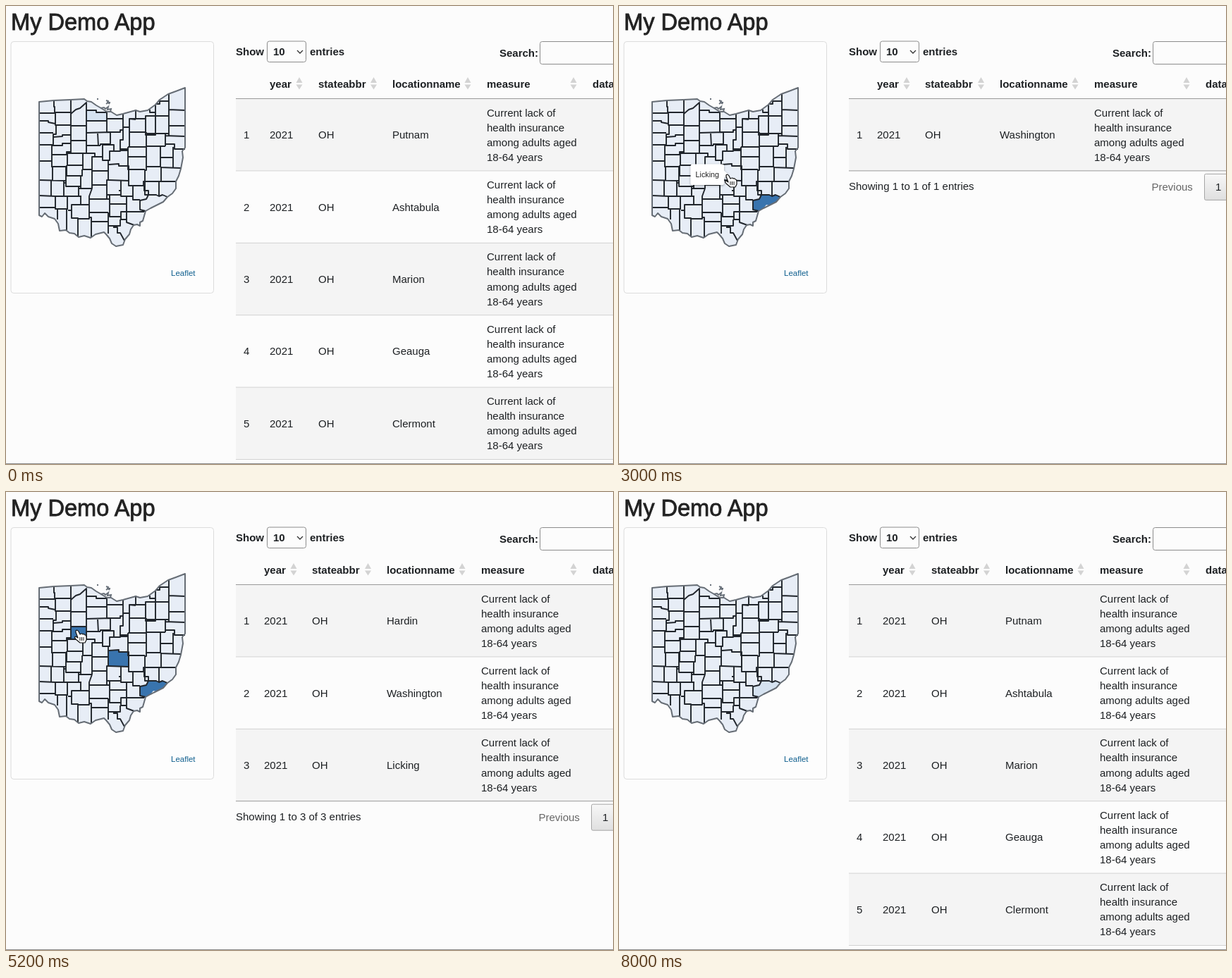
Recreate the animation shown at these times as an HTML page. Size 861 by 650 pixels, loop 8.2 s.

```html
<!DOCTYPE html>
<html lang="en">
<head>
<meta charset="utf-8">
<title>My Demo App</title>
<style>
html, body { margin: 0; width: 100%; height: 100%; overflow: hidden; background: #fcfcfc; }
svg { display: block; }
text { font: 15px "Liberation Sans", Arial, sans-serif; fill: #1d2023; }
.b { font-weight: bold; }
.title { font-size: 32.6px; fill: #222; stroke: #222; stroke-width: .8px; }
.link { font-size: 11.5px; fill: #11608f; }
.muted { fill: #666; }
.box { fill: #fcfcfc; stroke: #8c8c8c; }
.borders path { fill: none; stroke: #20252b; stroke-width: 1.9; stroke-linejoin: round; }
#tip text { font-size: 10.75px; fill: #222; }
#tip rect, #tip path { fill: #fff; }
</style>
</head>
<body>
<svg width="861" height="650" viewBox="0 0 861 650">
  <defs>
    <linearGradient id="btn" x2="0" y2="1"><stop stop-color="#f7f7f7"/><stop offset="1" stop-color="#dfdfdf"/></linearGradient>
    <filter id="shade" x="-20%" y="-30%" width="140%" height="180%"><feDropShadow dx="0" dy="1" stdDeviation="1.5" flood-opacity=".4"/></filter>
  </defs>
  <rect width="861" height="650" fill="#fcfcfc"/>
  <text class="title" x="7" y="34">My Demo App</text>
  <rect x="7" y="50.5" width="287.5" height="357" rx="4" fill="#fdfdfd" stroke="#dcdcdc"/>

  <path id="land" fill="#e7edf6" d="M47 136L68 134L92 133L111 132L115 135L121 136L128 141L135 145L143 150L149 150L157 155L166 153L184 148L190 150L201 148L212 140L218 133L230 125L241 121L254 116V201L250 206L251 215L248 231L245 241L241 249L241 259L236 266L229 271L223 278L213 283L205 287L198 291L196 298L194 305L190 307V312L186 310L181 311L177 317L175 324L169 331L166 339L156 341L150 337L147 330L142 324L139 321L127 324L120 329L111 326L103 328L97 323L90 322L85 318L76 319L74 309L69 302L60 299L55 294L51 299L47 297Z"/>
  <g id="fills">
    <path data-name="Sandusky" d="M114 148H128V151H143V163H114Z"/>
    <path data-name="Hardin" d="M92 191H114V209H92Z"/>
    <path data-name="Licking" d="M146 225L160 224V227H174V248L146 247Z"/>
    <path data-name="Washington" d="M190 276L199 274L202 268H213L217 270L222 268L229 271L223 278L213 283L209 282L205 287L198 291L190 289Z"/>
  </g>
  <g class="borders">
    <path d="M68 134V143H69V151M47 152H70V151H92M92 133V208M92 153L99 147L105 145L114 137V210M47 163H60V165L70 167M70 151V169H92M47 180H67M71 168V182H67V198M92 170H114M67 186L80 185V183H92M47 197H67M92 191H114M65 198H80V195H92M65 198V229M65 211H86V207H92M87 209H114"/>
    <path d="M114 148H128V151H143M143 149V179M114 163H143M114 180L148 179M130 180L131 199M114 198H134M143 160H166M143 179H162V176H166M148 179V197M134 198V196H148M166 153V190H162V204M184 147V160H175V200M166 172H175M175 179H199M175 160L184 161"/>
    <path d="M184 160H198V156H231M204 147V151H212V156M212 156V140M212 139H218V135H231M231 125V184M231 147L254 148M231 170H254M198 156V183H212V156M200 181H231M226 184L254 185M226 181V199M199 179V228M173 200H199M199 199H226M226 196H239V203H254M219 199V228M219 215H237V200M237 215V230M219 229L248 230M173 200V205H163M173 205V214H199M173 214V232H197M199 228H220"/>
    <path d="M114 209H126V214H137M137 197V219H147V206H153V197H137M147 206H162V203H173M126 214H122V259M145 219V248M122 234H146M109 209V232H122M87 207V226H110M86 226V241H108V232M65 228H86M47 220H65M66 228V247M47 247L85 248M85 228V256H106M106 240V258M122 259H103M122 254H143M146 247H143V274M146 225L160 224V227H174V248L146 247"/>
    <path d="M64 247V270M47 269L70 270H103M82 247V269M82 251H85M103 256V270H107M70 269V287M47 286H70V288H88M87 269V288M106 270V282H93V290H88M73 288V303M86 288V318M93 290V301H102V327M102 302H118V282H106M118 282V270L122 259M121 300V328M118 293H145M118 300H121V306H145M118 274H147"/>
    <path d="M163 247V268H143M147 268V299H163V292H171M147 281H171V270H163V262H160M174 248V255H180V275H190M180 270H171V292H196M174 232V248M197 232V249H195V255H180M196 255V262H202V268M145 293V323M163 299V303H171M145 312H162V303M171 292V303V307L182 311M152 314H158V322H162L168 333M199 228V233H197M220 228V249H197M220 249H242M197 249V268H213M217 249V269M190 276L199 274L202 268H213L217 270L222 268L229 271M190 276V289L198 291"/>
  </g>
  <use href="#land" fill="none" id="coast"/>
  <path d="M129 132h2M142 134l3 1l-1 2h4M142 139l3-2l2 2M134 145l5-1l2 2l4-3l-1 4l5-1l-1 4" fill="none" stroke="#687079" stroke-width="2"/>
  <text class="link" x="234" y="382.5">Leaflet</text>

  <text class="b" x="326" y="70">Show</text>
  <rect class="box" x="370.5" y="50" width="55" height="29.5" rx="3"/>
  <text class="b" x="379" y="70">10</text>
  <path d="M413 63l4 4l4-4" fill="none" stroke="#333" stroke-width="1.3"/>
  <text class="b" x="431" y="70">entries</text>
  <text class="b" x="700" y="72">Search:</text>
  <rect class="box" x="757.5" y="50.5" width="120" height="32" rx="3"/>
  <g id="table"></g>
  <rect y="649" width="861" height="1" fill="#8a8a8a"/>

  <g id="tip" filter="url(#shade)"><path/><rect height="29.5" rx="3"/><text text-anchor="middle"></text></g>
  <g id="arrow"><path d="M0 0V15L3.6 11.7L6 17.3L8.6 16.2L6.3 10.8H11Z" fill="#000" stroke="#fff"/></g>
  <g id="hand" stroke="#111" stroke-linejoin="round">
    <path d="M-3 1Q-1-1 1 2L3 6Q6 4 7 6Q9 5 10 7Q12 7 12 10V14L10 18H3L-3 13Q-6 9 -3 9L0 11L-3 3Z" fill="#fff" stroke-width="1.2"/>
    <path d="M3 10V15M5.5 10V15M8 10V15" fill="none"/>
  </g>
</svg>
<script>
const LOOP = 8200, STEP = 100, ROW = 102.4, TOP = 131.5;
const $ = s => document.querySelector(s);
const coast = $('#coast');
coast.setAttribute('style', 'stroke:#666d75;stroke-width:2;stroke-linejoin:round;fill-opacity:0');

const allRows = ['Putnam', 'Ashtabula', 'Marion', 'Geauga', 'Clermont'];
const measure = ['Current lack of', 'health insurance', 'among adults aged', '18-64 years'];
const heads = ['year', 'stateabbr', 'locationname', 'measure', 'data_value'];

// Selection after each click; "light" is the county last switched off
const states = [
  { t: 0, on: [], light: 'Sandusky' },
  { t: 2000, on: ['Washington'] },
  { t: 3300, on: ['Washington', 'Licking'] },
  { t: 4400, on: ['Hardin', 'Washington', 'Licking'] },
  { t: 5700, on: ['Washington', 'Licking'], light: 'Hardin' },
  { t: 6400, on: ['Washington'], light: 'Licking' },
  { t: 7400, on: [], light: 'Washington' }
];

// Pointer path: time, x, y, county; '' is a hand without a label, none is an arrow
const moves = [
  [700, 132, 520], [900, 134, 514], [1100, 150, 450], [1300, 177, 366], [1500, 198, 305],
  [1600, 204, 284, 'Washington'], [1700, 207, 276.5, 'Washington'],
  [2000, 207, 276.5, ''], [2200, 205, 275, 'Washington'], [2400, 188, 266, 'Morgan'],
  [2500, 177, 259, 'Perry'], [2600, 165, 251, 'Perry'], [2700, 155, 245, 'Licking'],
  [2800, 150, 245, 'Licking'], [3000, 155, 239, 'Licking'],
  [3300, 155, 239, ''], [3500, 139, 225, 'Delaware'], [3600, 122, 208, 'Marion'],
  [3700, 109, 195, 'Hardin'], [3800, 104, 190.5, 'Hancock'],
  [4100, 103, 194, 'Hardin'], [4400, 103, 194, ''], [5200, 102, 196, ''],
  [5700, 102, 196, ''], [5800, 107, 200, 'Hardin'], [5900, 124, 212, 'Marion'],
  [6000, 144, 226, 'Delaware'], [6100, 158, 233, 'Licking'],
  [6400, 158, 233, ''], [6600, 173, 245, 'Licking'], [6700, 186, 254, 'Muskingum'],
  [6800, 198, 264, 'Noble'], [6900, 206, 270, 'Washington'], [7000, 209, 270.5, 'Washington'],
  [7400, 209, 270.5, ''], [7600, 209, 270.5, ''], [7700, 226, 297],
  [7800, 298, 410], [7900, 394, 550], [8000, 394, 550]
];

const lastAt = (list, t, time) => list.filter(k => time(k) <= t).pop();
const stateAt = t => lastAt(states, Math.max(0, t), s => s.t);
const text = (x, y, s, cls = '') => `<text x="${x}" y="${y}" class="${cls}">${s}</text>`;
const line = (y, color) => `<rect x="326" y="${y - .5}" width="535" height="1" fill="${color}"/>`;

function tableMarkup(on) {
  const full = !on.length, rows = full ? allRows : on;
  const cols = full ? [374, 443, 548, 682, 832] : [366, 434, 540, 674, 832];
  const sorts = full ? [416, 521.5, 655, 805] : [408, 513.5, 647, 805];
  let out = heads.map((h, i) => text(cols[i], 115.5, h, 'b')).join('');
  out += sorts.map(x => `<path d="M${x - 4.5} 109h9l-4.5-8zM${x - 4.5} 111.5h9l-4.5 7z" fill="#d3d3d3"/>`).join('');
  rows.forEach((name, i) => {
    const y = TOP + i * ROW;
    if (i % 2 === 0) out += `<rect x="326" y="${y}" width="535" height="${ROW}" fill="#f4f4f4"/>`;
    out += line(y, i ? '#d2d2d2' : '#999');
    [i + 1, 2021, 'OH', name].forEach((s, c) => out += text(c ? cols[c - 1] : 337, y + 56.7, s));
    measure.forEach((s, k) => out += text(cols[3], y + 25 + k * 21.1, s));
  });
  const end = TOP + rows.length * ROW, n = rows.length;
  out += line(end, full ? '#d2d2d2' : '#999');
  if (!full) {
    out += text(326, end + 27.5, `Showing 1 to ${n} of ${n} entries`);
    out += text(755.5, end + 28.5, 'Previous', 'muted');
    out += `<rect x="830.5" y="${end + 4.5}" width="50" height="37" rx="2" fill="url(#btn)" stroke="#a5a5a5"/>`;
    out += text(846, end + 28.5, '1');
  }
  return out;
}

function place(el, show, x, y) {
  el.style.display = show ? '' : 'none';
  if (show) el.setAttribute('transform', `translate(${x} ${y})`);
}

function drawTip(label, x, y) {
  const tip = $('#tip');
  place(tip, label, x, y);
  if (!label) return;
  const t = tip.querySelector('text'), r = tip.querySelector('rect');
  t.textContent = label;
  const w = t.getComputedTextLength() + 14, side = x < 150 ? 1 : -1;
  const left = side > 0 ? 6 : -6 - w;
  t.setAttribute('x', left + w / 2);
  t.setAttribute('y', 3.8);
  r.setAttribute('x', left);
  r.setAttribute('y', -14.5);
  r.setAttribute('width', w);
  tip.querySelector('path').setAttribute('d', `M0 0L${side * 7} -6V6Z`);
}

function drawPointer(t) {
  const i = moves.findIndex(m => m[0] > t);
  const shown = i > 0, a = shown ? moves[i - 1] : moves[0], b = shown ? moves[i] : a;
  const p = shown ? (t - a[0]) / (b[0] - a[0]) : 0;
  const x = a[1] + (b[1] - a[1]) * p, y = a[2] + (b[2] - a[2]) * p;
  const label = a[3], hand = label !== undefined;
  place($('#arrow'), shown && !hand, x, y);
  place($('#hand'), shown && hand, x, y);
  drawTip(shown && label, x, y);
}

let shownRows;
function draw(t) {
  const now = stateAt(t), rows = stateAt(t - STEP).on;
  document.querySelectorAll('#fills path').forEach(p => {
    const name = p.dataset.name;
    p.setAttribute('fill', now.on.includes(name) ? '#3974ae' : now.light === name ? '#d5e2f0' : '#e7edf6');
  });
  if (rows !== shownRows) $('#table').innerHTML = tableMarkup(shownRows = rows);
  drawPointer(t);
}

function tick() {
  draw(Math.floor(performance.now() % LOOP / STEP) * STEP);
  requestAnimationFrame(tick);
}
tick();
</script>
</body>
</html>
```
